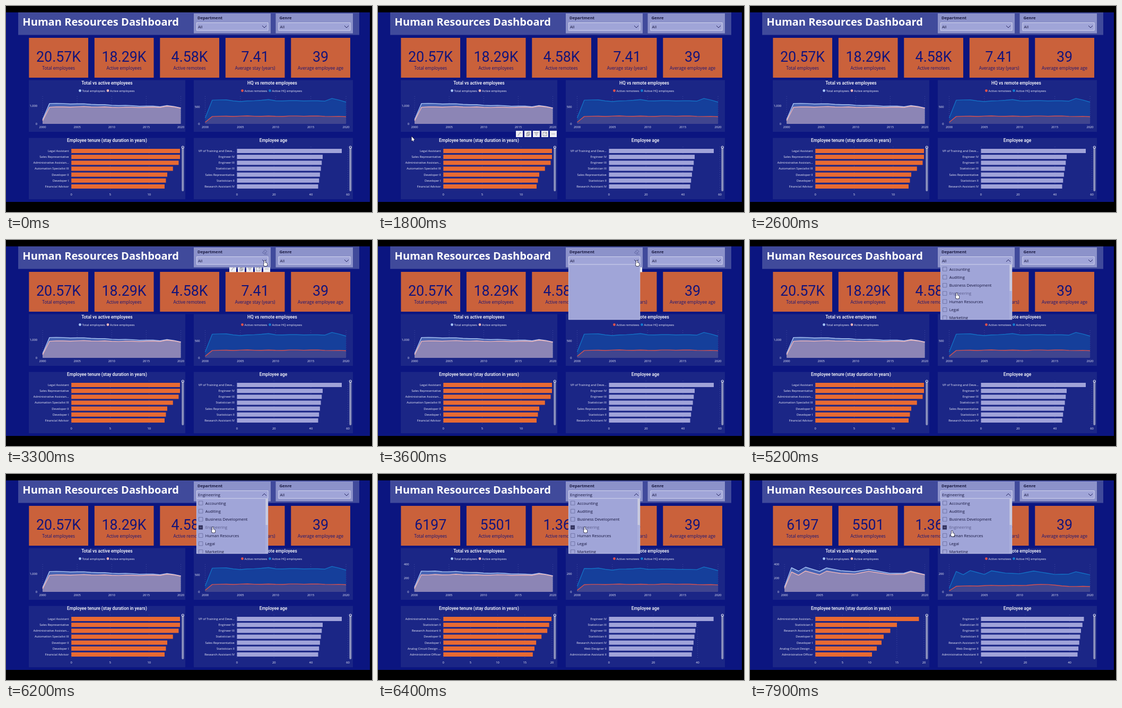
Write an HTML page with a canvas that moves like this. It is 690 px wide and 388 px high and loops after 8000 ms.

```html
<!DOCTYPE html>
<html lang="en">
<head>
<meta charset="utf-8">
<title>Human Resources Dashboard</title>
<style>
html, body { margin: 0; width: 100%; height: 100%; overflow: hidden; background: #000; }
canvas { display: block; width: 690px; height: 388px; }
</style>
</head>
<body>
<canvas id="stage"></canvas>
<script>
const LOOP = 8000, STEP = 100, BASE = 222;
const canvas = document.getElementById('stage');
const ratio = window.devicePixelRatio || 1;
canvas.width = 690 * ratio;
canvas.height = 388 * ratio;
const ctx = canvas.getContext('2d');

const SANS = '"Open Sans", "Noto Sans", sans-serif';
const DIN = 'Roboto, sans-serif';
const NAVY = '#14147a', SOFT = '#f0f1fb';

const clamp = v => Math.max(0, Math.min(1, v));
const ease = v => { v = clamp(v); return v * v * (3 - 2 * v); };
const mix = (a, b, k) => a + (b - a) * k;
const mixList = (a, b, k) => a.map((v, i) => mix(v, b[i], k));
const wave = i => Math.sin(i * 1.9) * 0.5 + Math.sin(i * 0.8) * 0.3;

// Piecewise line through key points [index, value], sampled at each index.
function path(...keys) {
  const out = [];
  for (let i = 0; i <= keys[keys.length - 1][0]; i++) {
    const n = Math.max(1, keys.findIndex(key => key[0] >= i));
    const [[a, from], [b, to]] = [keys[n - 1], keys[n]];
    out.push(mix(from, to, (i - a) / (b - a)));
  }
  return out;
}
const ripple = (ys, size) => ys.map((y, i) => i ? y + size * wave(i) : y);
// A line below another one, closing in on it by the last year.
const below = (ys, gap) => ys.map((y, i) => y + gap * (i ? 1 - i / 20 : 0.25) + 0.4);

const allTotal = ripple(path([0, 214], [1, 183], [8, 185.5], [14, 188.5], [17, 189], [18, 187], [20, 192]), 0.9);
const engTotal = path([0, 213], [1, 176.5], [2, 183], [3, 175.5], [5, 183.5], [6, 177], [8, 182], [10, 184], [12, 179.5], [15, 187], [17, 187], [18, 183], [20, 189.5]);

// Ticks are [value step, pixels per step].
const ALL = {
  cards: ['20.57K', '18.29K', '4.58K', '7.41', '39'],
  total: allTotal,
  active: below(allTotal, 7),
  hq: ripple(path([0, 211], [1, 177], [3, 176.8], [5, 180.2], [9, 176.4], [10, 178.3], [17, 178.8], [18, 173.8], [20, 181]), 0.6),
  remote: ripple(path([0, 219], [1, 207.6], [17, 207.4], [20, 208.5]), 0.8),
  leftX: 69,
  leftTick: [1000, 34.5],
  rightTick: [500, 32.5],
  jobs: ['Legal Assistant', 'Sales Representative', 'Administrative Assistan...', 'Automation Specialist III', 'Developer II', 'Developer I', 'Financial Advisor'],
  tenure: path([0, 328], [1, 328], [2, 325.5], [4, 304], [6, 299]),
  tenureTick: [5, 73.3],
  ageJobs: ['VP of Training and Deve...', 'Engineer IV', 'Engineer III', 'Statistician III', 'Sales Representative', 'Statistician II', 'Research Assistant IV'],
  age: path([0, 633], [1, 597], [6, 588.5]),
  ageTick: [20, 69.7]
};
const ENG = {
  cards: ['6197', '5501', '1.36K', '7.38', '39'],
  total: engTotal,
  active: below(engTotal, 8),
  hq: below(engTotal, 7),
  remote: ripple(path([0, 220], [1, 211], [10, 209.7], [14, 208], [16, 211], [20, 212]), 0.8),
  leftX: 65,
  leftTick: [200, 25.8],
  rightTick: [200, 34.5],
  jobs: ['Administrative Assistan...', 'Statistician II', 'Research Assistant II', 'Developer II', 'Developer I', 'Analog Circuit Design ...', 'Administrative Officer'],
  tenure: path([0, 318.5], [1, 277], [3, 252], [4, 248], [6, 230]),
  tenureTick: [5, 51.2],
  ageJobs: ['Engineer IV', 'Statistician III', 'Engineer III', 'Statistician II', 'Research Assistant IV', 'Web Designer II', 'Administrative Assistant II'],
  age: path([0, 629.5], [2, 624], [6, 617.5]),
  ageTick: [20, 83.5]
};
const DEPARTMENTS = ['Accounting', 'Auditing', 'Business Development', 'Engineering', 'Human Resources', 'Legal', 'Marketing'];
const CAPTIONS = ['Total employees', 'Active employees', 'Active remotees', 'Average stay (years)', 'Average employee age'];

function box(x, y, w, h, fill) {
  ctx.fillStyle = fill;
  ctx.fillRect(x, y, w, h);
}

function frame(x, y, w, h, color, width = 0.8) {
  ctx.strokeStyle = color;
  ctx.lineWidth = width;
  ctx.strokeRect(x, y, w, h);
}

function text(str, x, y, size, color, align = 'left', weight = 400, family = SANS) {
  ctx.font = `${weight} ${size}px ${family}`;
  ctx.textAlign = align;
  ctx.fillStyle = color;
  ctx.fillText(str, x, y);
}
const label = (str, x, y, align) => text(str, x, y, 5.75, SOFT, align, 500);
const heading = (str, x, y) => text(str, x, y, 8.4, '#fff', 'center', 500, DIN);

function stroke(points, color, width = 1, closed = false) {
  ctx.beginPath();
  points.forEach(([x, y]) => ctx.lineTo(x, y));
  if (closed) ctx.closePath();
  ctx.strokeStyle = color;
  ctx.lineWidth = width;
  ctx.lineJoin = 'round';
  ctx.stroke();
}

function dot(x, y, r, color) {
  ctx.beginPath();
  ctx.arc(x, y, r, 0, 7);
  ctx.fillStyle = color;
  ctx.fill();
}

function guide(x, top, bottom) {
  ctx.setLineDash([1, 3]);
  stroke([[x, top], [x, bottom]], 'rgba(190,200,255,.3)', 0.8);
  ctx.setLineDash([]);
}

function area(ys, x0, x1, line, fill) {
  const pts = ys.map((y, i) => [mix(x0, x1, i / 20), y]);
  ctx.beginPath();
  ctx.moveTo(x0, BASE);
  pts.forEach(p => ctx.lineTo(...p));
  ctx.lineTo(x1, BASE);
  ctx.fillStyle = fill;
  ctx.fill();
  stroke(pts, line, 1.4);
}

function lineChart(title, center, x0, x1, series, legend, [step, px]) {
  heading(title, center, 148);
  legend.forEach(([name, x, color]) => {
    dot(x, 159.5, 2.4, color);
    label(name, x + 4, 161.6);
  });
  for (let i = 0; i <= 4; i++) guide(mix(x0, x1, i / 4), 170, BASE);
  series.forEach(([ys, line, fill]) => area(ys, x0, x1, line, fill));
  for (let i = 0; i <= 4; i++) label(2000 + i * 5, mix(x0, x1, i / 4), 230.2, 'center');
  for (let i = 0; BASE - i * px >= 170; i++)
    label((i * step).toLocaleString('en-US'), x0 - 10, BASE + 2 - i * px, 'right');
}

function barChart(title, center, x0, names, ends, [step, px], color, scrollX) {
  heading(title, center, 256.4);
  for (let i = 0; x0 + i * px < scrollX - 3; i++) {
    guide(x0 + i * px, 265, 347);
    label(i * step, x0 + i * px, 356.8, 'center');
  }
  ends.forEach((end, i) => {
    const y = 273 + i * 11.15;
    box(x0, y - 4, end - x0, 8, color);
    label(names[i], x0 - 4.7, y + 2, 'right');
  });
  ctx.beginPath();
  ctx.roundRect(scrollX - 2, 264, 4, 85, 2);
  ctx.fillStyle = '#8b91bd';
  ctx.fill();
  dot(scrollX, 266, 2.5, '#e4e6f3');
  dot(scrollX, 266, 1.4, '#1b2686');
}

function chevron(x, y, up) {
  const d = up ? -2 : 2;
  stroke([[x - 4, y - d], [x, y + d], [x + 4, y - d]], '#23235f');
}

function slicer(x, w, name, value, open) {
  box(x, 14, w, 37.5, '#8c92ca');
  text(name, x + 7, 25, 7.7, '#18183f', 'left', 700);
  box(x + 5, 31, w - 9.5, 15.5, '#a0a5d8');
  frame(x + 5.5, 31.5, w - 10.5, 14.5, '#d0d3ee', 1);
  text(value, x + 8, 41.8, 7.6, '#14143c');
  chevron(x + w - 12, 39, open);
}

function eraser() {
  const ink = '#5d639f';
  stroke([[483.5, 24], [488, 18.5], [492, 21.5], [487.5, 26.5]], ink, 0.9, true);
  stroke([[485.5, 21.5], [490, 24.5]], ink, 0.8);
  stroke([[487, 26.8], [493, 26.8]], ink, 0.8);
}

function toolbar(x, y) {
  const ink = '#7b7b86';
  for (let i = 0; i < 5; i++) box(x + i * 16, y, 13, 12, '#eeeef4');
  stroke([[x + 4, y + 9], [x + 6, y + 6], [x + 8, y + 3], [x + 10, y + 5]], ink, 0.8);
  frame(x + 20, y + 4, 4, 5.5, ink);
  frame(x + 22, y + 2.5, 4, 5.5, ink);
  for (let i = 0; i < 3; i++) {
    const r = 4 - i * 1.5, row = y + 3.5 + i * 2.5;
    stroke([[x + 38.5 - r, row], [x + 38.5 + r, row]], ink, 0.9);
    dot(x + 68 + i * 2.5, y + 6, 0.7, ink);
  }
  frame(x + 51, y + 3, 7, 6.5, ink);
  stroke([[x + 54, y + 7], [x + 58, y + 3]], ink, 0.8);
}

function popup(t) {
  box(359, 46, 135, 104, '#a0a5d8');
  if (t >= 3800) {
    const hover = t < 4300 ? -1 : t < 5000 ? 1 : 3;
    ctx.save();
    ctx.beginPath();
    ctx.rect(359, 46, 135, 104);
    ctx.clip();
    DEPARTMENTS.forEach((name, i) => {
      const y = 54.7 + i * 15.3;
      if (i === 3 && t >= 6000) {
        box(363, y - 4, 8, 8, '#34345f');
        box(365, y - 0.5, 4, 1, '#70749f');
      } else {
        frame(363.5, y - 3.7, 7.4, 7.4, '#666b9d');
      }
      text(name, 375.7, y + 2.8, 7.5, i === hover ? '#5a5c8c' : '#14143c');
    });
    box(489, 46, 5, 104, '#a9aedc');
    box(489.5, 47, 4.5, 49, '#c9cbdf');
    ctx.restore();
  }
  frame(359.4, 46.4, 134.4, 103.4, '#c3c7e8');
}

function outlined() {
  ctx.strokeStyle = '#15152f';
  ctx.lineWidth = 1.4;
  ctx.stroke();
  ctx.fillStyle = '#fff';
  ctx.fill();
}

function arrow(x, y) {
  ctx.beginPath();
  ctx.moveTo(x, y);
  ctx.lineTo(x, y + 8);
  ctx.lineTo(x + 5.5, y + 5.7);
  ctx.closePath();
  outlined();
  stroke([[x + 2, y + 5.5], [x + 3.6, y + 8.6]], '#fff', 1.3);
}

function hand(x, y) {
  ctx.beginPath();
  ctx.roundRect(x, y, 1.9, 7, 0.9);
  ctx.roundRect(x - 1, y + 4.6, 6.4, 6, 2);
  outlined();
}

// Each leg: start, end, from, to.
const LEGS = [
  [1500, 1800, [50, 272], [63.5, 246]],
  [1900, 2300, [63.5, 246], [34, 322]],
  [2900, 3300, [420, 120], [487, 38.5]],
  [4100, 4500, [487, 38.5], [395, 74]],
  [4800, 5200, [395, 74], [389, 100]],
  [7800, 7900, [389, 100], [380, 107]]
];

function cursor(t) {
  if (t < 1500 || (t >= 2300 && t < 2900)) return;
  const [start, end, from, to] = LEGS.filter(leg => leg[0] <= t).pop();
  const [x, y] = mixList(from, to, ease((t - start) / (end - start)));
  (t >= 3200 ? hand : arrow)(x, y);
}

function draw(t) {
  const morph = ease((t - 6300) / 500);
  const data = t >= 6400 ? ENG : ALL;
  const blend = key => mixList(ALL[key], ENG[key], morph);

  ctx.setTransform(ratio, 0, 0, ratio, 0, 0);
  box(0, 0, 690, 388, '#000');
  box(0, 12, 686, 357, '#0b1580');
  box(23, 12, 643, 42.5, '#404a9b');
  text('Human Resources Dashboard', 31.3, 37.3, 20.1, '#fff', 'left', 700);

  CAPTIONS.forEach((caption, i) => {
    const x = 43.3 + i * 123.5;
    box(x, 60, 111.7, 75, '#ca613b');
    text(data.cards[i], x + 55.8, 105, 26.8, NAVY, 'center', 400, DIN);
    text(caption, x + 55.8, 120.3, 8.2, NAVY, 'center');
  });

  [[139.5, 97.5], [248.5, 115.5]].forEach(([y, h]) => {
    box(43, y, 295, h, '#1b2686');
    box(354, y, 300, h, '#1b2686');
  });

  lineChart('Total vs active employees', 190.5, mix(ALL.leftX, ENG.leftX, morph), 329.5,
    [[blend('total'), '#a9c4f5', '#4864b4'], [blend('active'), '#efb5b9', '#8c85b5']],
    [['Total employees', 139.5, '#a9c8ff'], ['Active employees', 192, '#f0b6bb']], data.leftTick);
  lineChart('HQ vs remote employees', 502, 375.5, 641,
    [[blend('hq'), '#136fc4', '#153f9b'], [blend('remote'), '#d6504f', '#40458f']],
    [['Active remotees', 445.5, '#e0514c'], ['Active HQ employees', 497.5, '#137ad0']], data.rightTick);
  barChart('Employee tenure (stay duration in years)', 190.5, 123.2, data.jobs, blend('tenure'), data.tenureTick, '#e86a32', 333.3);
  barChart('Employee age', 504, 435.5, data.ageJobs, blend('age'), data.ageTick, '#a0a3d9', 649.3);

  if (t >= 1700 && t < 2100) toolbar(260, 235);
  if (t >= 3100 && t < 3700) toolbar(421, 48.5);

  slicer(354, 145, 'Department', t >= 6000 ? 'Engineering' : 'All', t >= 3700);
  slicer(508.5, 145.5, 'Genre', 'All', false);
  if (t >= 3100 && t < 4300) eraser();
  if (t >= 3600) popup(t);
  cursor(t);
}

const began = performance.now();
function tick() {
  const t = (performance.now() - began) % LOOP;
  draw(Math.floor(t / STEP) * STEP);
  requestAnimationFrame(tick);
}
tick();
</script>
</body>
</html>
```
